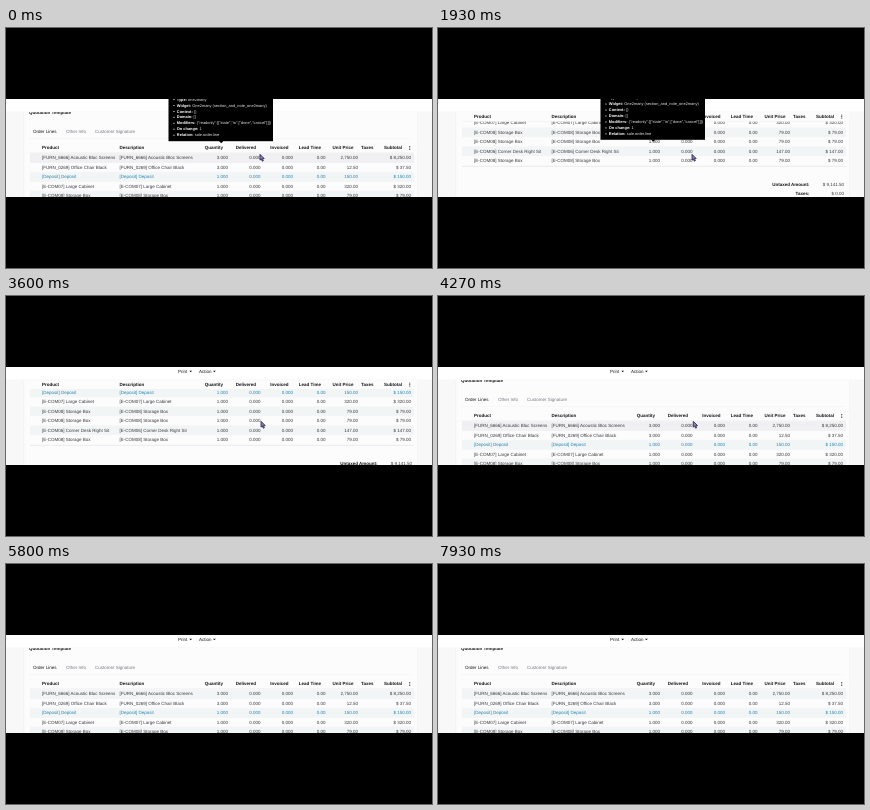
These frames come from a looping animation (426x240 px, 7.99 s). An HTML page with a canvas:

```html
<!DOCTYPE html>
<html lang="en">
<head>
<meta charset="utf-8">
<title>Order lines with sticky header</title>
<style>
  html, body { margin: 0; width: 100%; height: 100%; overflow: hidden; background: #000; }
  canvas { display: block; width: 426px; height: 240px; }
</style>
</head>
<body>
<canvas id="stage" width="426" height="240"></canvas>
<script>
const ctx = document.getElementById('stage').getContext('2d');
const LOOP = 7990, STEPS = 120;
const TOP = 71, BOTTOM = 169, BAR = 84;
const ROW_Y = 130, ROW_H = 9.45, MAX_SCROLL = 82;
const INK = '#39393d', DARK = '#141418', LINK = '#77777f', INFO = '#2484ad';
const SHEET = '#fcfcfd', STRIPE = '#f2f5f6', RULE = '#ececec';

const lines = [
  ['[FURN_6666] Acoustic Bloc Screens', '3.000', '2,750.00', '$ 8,250.00'],
  ['[FURN_0269] Office Chair Black', '3.000', '12.50', '$ 37.50'],
  ['[Deposit] Deposit', '1.000', '150.00', '$ 150.00'],
  ['[E-COM07] Large Cabinet', '1.000', '320.00', '$ 320.00'],
  ['[E-COM08] Storage Box', '1.000', '79.00', '$ 79.00'],
  ['[E-COM08] Storage Box', '1.000', '79.00', '$ 79.00'],
  ['[E-COM06] Corner Desk Right Sit', '1.000', '147.00', '$ 147.00'],
  ['[E-COM08] Storage Box', '1.000', '79.00', '$ 79.00']
];

const facts = [
  ['Type:', 'one2many'],
  ['Widget:', 'One2many (section_and_note_one2many)'],
  ['Context:', '{}'],
  ['Domain:', '[]'],
  ['Modifiers:', '{"readonly":[["state","in",["done","cancel"]]]}'],
  ['On change:', '1'],
  ['Relation:', 'sale.order.line']
];

function rect(x, y, w, h, color) {
  ctx.fillStyle = color;
  ctx.fillRect(x, y, w, h);
}

function shape(points, color) {
  ctx.beginPath();
  points.forEach(([x, y]) => ctx.lineTo(x, y));
  ctx.closePath();
  ctx.fillStyle = color;
  ctx.fill();
}

// Draws text around the middle line y and returns its width.
function text(str, x, y, { color = INK, bold = false, size = 4.5, right = false } = {}) {
  const zoom = 4;
  ctx.save();
  ctx.translate(x, y + size * 0.29);
  ctx.scale(1 / zoom, 1 / zoom);
  ctx.font = `${bold ? 'bold ' : ''}${size * zoom}px "Liberation Sans", Arial, sans-serif`;
  ctx.textRendering = 'geometricPrecision';
  ctx.textAlign = right ? 'right' : 'left';
  ctx.fillStyle = color;
  ctx.fillText(str, 0, 0);
  const width = ctx.measureText(str).width / zoom;
  ctx.restore();
  return width;
}

function clipped(y, bottom, draw) {
  ctx.save();
  ctx.beginPath();
  ctx.rect(0, y, 426, bottom - y);
  ctx.clip();
  draw();
  ctx.restore();
}

function ease(t, from, to) {
  const u = Math.min(1, Math.max(0, (t - from) / (to - from)));
  return u * u * (3 - 2 * u);
}

function drawTabs(scroll) {
  const y = 104 - scroll;
  text('Quotation Template', 23, 84.3 - scroll, { bold: true, color: DARK });
  text('Order Lines', 27, y, { color: DARK });
  text('Other Info', 60, y, { color: LINK });
  text('Customer Signature', 89, y, { color: LINK });
  rect(23, 110 - scroll, 384, 0.5, '#f0f0f2');
}

function drawRow([name, qty, price, total], i, scroll, hover) {
  const y = ROW_Y + i * ROW_H - scroll;
  const color = i === 2 ? INFO : INK;
  const put = (str, x) => text(str, x, y, { color, right: true });
  if (hover) rect(24, y - ROW_H / 2, 384, ROW_H, '#f0eff1');
  else if (i % 2 === 0) rect(24, y - ROW_H / 2, 384, ROW_H, STRIPE);
  rect(24, y + ROW_H / 2 - 0.4, 384, 0.4, '#f1f1f3');
  text(name, 36, y, { color });
  text(name, 113.5, y, { color });
  put(qty, 222);
  put('0.000', 254.5);
  put('0.000', 287);
  put('0.00', 319.5);
  put(price, 352);
  put(total, 405);
}

function drawTotals(scroll) {
  const label = (str, y) => text(str, 371.5, y - scroll, { bold: true, color: DARK, right: true });
  rect(24, 201.5 - scroll, 384, 0.8, RULE);
  label('Untaxed Amount:', 220);
  label('Taxes:', 229);
  label('Total:', 238.3);
  text('$ 9,141.50', 406, 220 - scroll, { right: true });
  text('$ 0.00', 406, 229 - scroll, { right: true });
  text('$ 9,141.50', 406, 238.3 - scroll, { bold: true, size: 5.7, color: DARK, right: true });
}

function drawHeader(y) {
  const put = (str, x, right) => text(str, x, y, { bold: true, color: DARK, right });
  rect(18.5, y - 4.8, 393, 9.6, SHEET);
  rect(24, y + 4.6, 384, 0.5, RULE);
  put('Product', 36);
  put('Description', 113.5);
  put('Quantity', 217, true);
  put('Delivered', 250, true);
  put('Invoiced', 282.5, true);
  put('Lead Time', 315, true);
  put('Unit Price', 347.5, true);
  put('Taxes', 355);
  put('Subtotal', 396, true);
  for (let k = -1; k <= 1; k++) rect(403.3, y + k * 1.5 - 0.4, 0.9, 0.9, DARK);
}

function drawBar() {
  rect(0, TOP, 426, BAR - TOP, '#fff');
  rect(0, BAR - 0.4, 426, 0.5, '#f2f2f4');
  for (const [str, x, caret] of [['Print', 172, 184.7], ['Action', 193, 208.4]]) {
    text(str, x, 75.5, { color: DARK });
    shape([[caret - 1.4, 74.7], [caret + 1.4, 74.7], [caret, 76.2]], DARK);
  }
}

function drawTooltip(shift) {
  rect(162.5, TOP, 104.5, 42.2 - shift, '#000');
  shape([[213, 113 - shift], [217.4, 113 - shift], [215.2, 115.2 - shift]], '#000');
  facts.forEach(([key, value], i) => {
    const y = 71.5 + i * 5.95 - shift;
    rect(167.4, y - 0.5, 1.1, 1.1, '#ddd');
    const w = text(key, 170.8, y, { bold: true, size: 3.93, color: '#fff' });
    text(value, 171.9 + w, y, { size: 3.93, color: '#e8e8e8' });
  });
}

function drawCursor(x, y) {
  const arrow = [[0, 0], [0, 5.8], [1.3, 4.7], [2.3, 6.9], [3.4, 6.4], [2.5, 4.3], [4.2, 4.2]];
  shape(arrow.map(([dx, dy]) => [x + dx, y + dy]), '#8480ae');
  ctx.strokeStyle = '#2a2350';
  ctx.lineWidth = 0.8;
  ctx.stroke();
}

function draw(t) {
  const scroll = MAX_SCROLL * (ease(t, 1170, 2270) - ease(t, 3250, 4100));
  const pointer = t < 5000;
  const headY = Math.max(88.6, 120 - scroll);
  const atTop = scroll < 1;

  rect(0, 0, 426, 240, '#000');
  clipped(TOP, BOTTOM, () => {
    rect(0, TOP, 426, BOTTOM - TOP, '#f9f8f8');
    rect(17.5, BAR, 394.5, BOTTOM - BAR, '#f0eff1');
    rect(18.2, BAR, 393.2, BOTTOM - BAR, SHEET);
    clipped(BAR, BOTTOM, () => {
      drawTabs(scroll);
      lines.forEach((line, i) => drawRow(line, i, scroll, i === 0 && atTop && pointer));
      drawTotals(scroll);
      drawHeader(headY);
    });
    drawBar();
    if (t < 2300) drawTooltip(1.4 * Math.min(1, scroll / 63));
    if (pointer) {
      const drift = ease(t, 2300, 2900);
      drawCursor(254 + drift + 0.3 * ease(t, 3900, 4200), 126.3 - drift);
    }
  });
}

const start = performance.now();
function tick() {
  const t = (performance.now() - start) % LOOP;
  const step = LOOP / STEPS;
  draw(Math.floor((t + 4) / step) % STEPS * step);
  requestAnimationFrame(tick);
}
tick();
</script>
</body>
</html>
```
